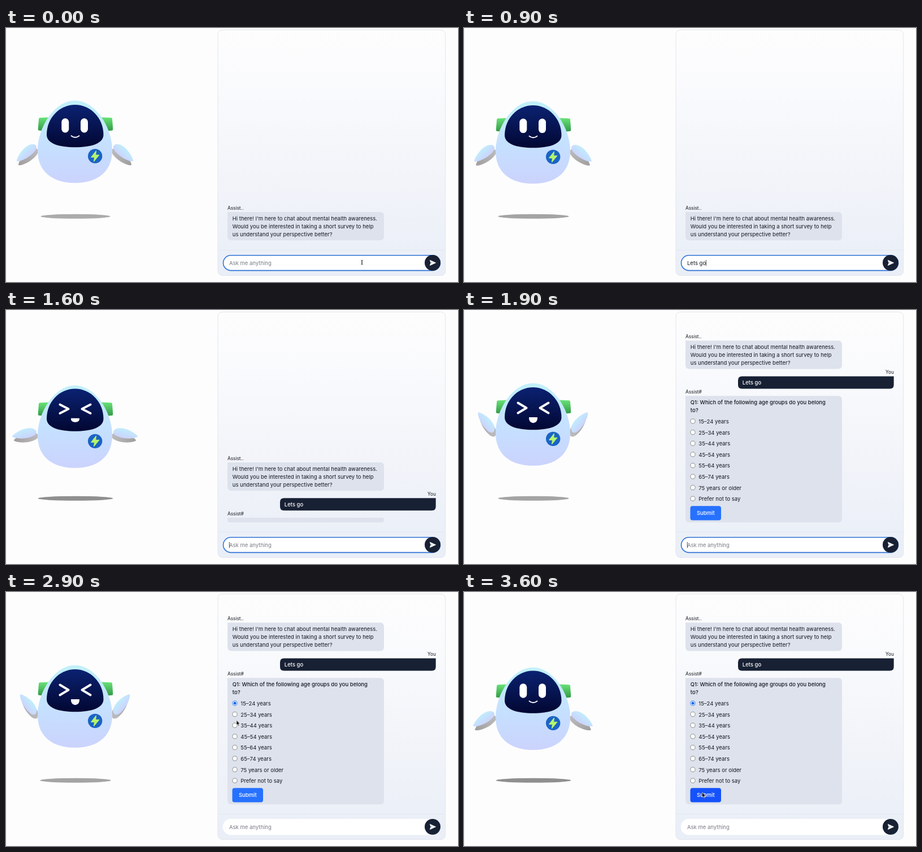
An HTML page that plays this animation: 800x450 px, repeating every 6.6 s.

```html
<!DOCTYPE html>
<html lang="en">
<head>
<meta charset="utf-8">
<title>Survey assistant</title>
<style>
html, body { margin: 0; width: 100%; height: 100%; overflow: hidden; background: #fdfdfd; }
svg { display: block; width: 800px; height: 450px; }
text { font: 9.5px Inter, "Liberation Sans", sans-serif; fill: #14171f; white-space: pre; }
.label { font-size: 8.3px; }
.mid { font-weight: 500; }
.light { fill: #fff; font-weight: 500; }
.hint { fill: #777b84; }
</style>
</head>
<body>
<svg viewBox="0 0 800 450">
  <defs>
    <linearGradient id="panelFill" x2="0" y2="1">
      <stop stop-color="#fdfdfd"/><stop offset=".2" stop-color="#fafbfd"/>
      <stop offset=".6" stop-color="#f2f4f9"/><stop offset="1" stop-color="#e9eef7"/>
    </linearGradient>
    <linearGradient id="shell" x2="0" y2="1">
      <stop stop-color="#c1f1fa"/><stop offset=".5" stop-color="#c5e1ff"/><stop offset="1" stop-color="#cbd3fd"/>
    </linearGradient>
    <linearGradient id="glass" x2="0" y2="1">
      <stop stop-color="#0b2272"/><stop offset="1" stop-color="#020732"/>
    </linearGradient>
    <linearGradient id="ear" x2="0" y2="1">
      <stop stop-color="#69e377"/><stop offset="1" stop-color="#2f9544"/>
    </linearGradient>
    <linearGradient id="wing" x1="0" x2=".25" y2="1">
      <stop stop-color="#bff0fc"/><stop offset="1" stop-color="#cad5fd"/>
    </linearGradient>
    <linearGradient id="under" x2="1">
      <stop stop-color="#a19d9d"/><stop offset="1" stop-color="#bcbcbe"/>
    </linearGradient>
    <path id="leaf" d="M5 0C4-8-9-10-19-8C-29-6-38-1-39 1C-37 5-22 9-10 8C-1 7 5 5 5 0Z"/>
    <g id="arm">
      <g transform="translate(52 218)"><use class="swing" href="#leaf" fill="url(#under)"/></g>
      <g transform="translate(49 211)"><use class="swing" href="#leaf" fill="url(#wing)"/></g>
    </g>
    <path id="earShape" d="M60 159L82 158V184L58 181.5Q56.5 181 56.7 179L58 161Q58.3 159 60 159Z"/>
  </defs>
  <rect width="800" height="450" fill="#fdfdfd"/>
  <rect width="1" height="450" fill="#f0f0f1"/>

  <ellipse id="shadow" cx="123" cy="333.8" ry="4"/>
  <g id="robot">
    <use href="#earShape" fill="url(#ear)"/>
    <use href="#earShape" fill="url(#ear)" transform="translate(246) scale(-1 1)"/>
    <use href="#arm"/>
    <use href="#arm" transform="translate(244) scale(-1 1)"/>
    <path fill="url(#shell)" d="M122 128.5C158 128.5 188 176 188 217C188 256 160 274.5 122 274.5S56 256 56 217C56 176 86 128.5 122 128.5Z"/>
    <circle cx="157.7" cy="227" r="12.7" fill="#1b64c6"/>
    <path d="M159.5 217.5L150.5 229H156.5L155.5 236.5L165 225H158.7Z" fill="#b6f56e" stroke="#b6f56e" stroke-linejoin="round"/>
  </g>
  <path id="visor" fill="url(#glass)" d="M122.3 136C150 136 172.5 160 172.5 189C172.5 205 150 211.3 122.3 211.3S72 205 72 189C72 160 94 136 122.3 136Z"/>
  <g id="face" fill="#fff">
    <g id="calm">
      <rect x="98.3" y="160" width="13" height="25.5" rx="6.5"/>
      <rect x="132" y="160" width="13" height="25.5" rx="6.5"/>
      <path d="M115.5 191Q122.5 196.5 129.5 191" fill="none" stroke="#fff" stroke-width="1.9" stroke-linecap="round"/>
    </g>
    <g id="joy">
      <path id="squint" fill="none" stroke="#fff" stroke-width="4" stroke-linecap="round" stroke-linejoin="round"/>
      <path id="grin"/>
    </g>
  </g>

  <rect x="375" y="3.5" width="402.7" height="435" rx="8" fill="url(#panelFill)" stroke="#e2e5ec"/>
  <path d="M375.5 393.5H777.5" stroke="#e3e7ef"/>

  <g id="intro">
    <text class="label" x="392" y="322">Assist..</text>
    <path fill="#dde2ec" d="M392 326H662Q669 326 669 333V369Q669 376.3 662 376.3H399Q392 376.3 392 369Z"/>
    <text x="400.8" y="341">Hi there! I'm here to chat about mental health awareness.</text>
    <text x="400.8" y="355">Would you be interested in taking a short survey to help</text>
    <text x="400.8" y="369">us understand your perspective better?</text>
  </g>
  <g id="reply">
    <text class="label" x="761" y="328.5" text-anchor="end">You</text>
    <path fill="#182134" d="M492 333.3H760.7V348.3Q760.7 355.3 753.7 355.3H492Q485 355.3 485 348.3V340.3Q485 333.3 492 333.3Z"/>
    <text class="light" x="492.8" y="347.7">Lets go</text>
    <text class="label" x="392" y="364">Assist#</text>
  </g>
  <path id="loader" fill="#dde2ec" d="M392 368H665Q669 368 669 372T665 376.2H396Q392 376.2 392 372Z"/>
  <g id="quiz">
    <path fill="#dde2ec" d="M392 152.3H662Q669 152.3 669 159.3V369.3Q669 376.3 662 376.3H399Q392 376.3 392 369.3Z"/>
    <text class="mid" x="400.8" y="167.3">Q1: Which of the following age groups do you belong</text>
    <text class="mid" x="400.8" y="181.3">to?</text>
    <g id="options"></g>
    <rect id="submit" x="400.5" y="347.2" width="54.5" height="25.3" rx="4"/>
    <text class="light" x="427.8" y="363.3" text-anchor="middle">Submit</text>
  </g>

  <rect id="field" x="384.5" y="402.8" width="384" height="26.8" rx="13.4" fill="#fff" stroke-width="1.6"/>
  <text id="hint" class="hint" x="395" y="419.7">Ask me anything</text>
  <text id="typed" x="395" y="419.7"></text>
  <path id="caret" d="M0 411V421.5" stroke="#222" stroke-width=".8"/>
  <circle cx="755" cy="416" r="14" fill="#182134"/>
  <path d="M750.3 411.2L760.7 416L750.3 420.8L751.5 416.7L756 416L751.5 415.3Z" fill="#fff" stroke="#fff" stroke-width=".6" stroke-linejoin="round"/>

  <path id="beam" d="M628.3 411.3Q630 411.3 630 412.5V418Q630 419.2 628.3 419.2M631.7 411.3Q630 411.3 630 412.5V418Q630 419.2 631.7 419.2" fill="none" stroke="#333" stroke-width=".9"/>
  <path id="arrow" d="M0 0V8.6L2 6.9L3.4 10L4.8 9.4L3.5 6.3H6.1Z" fill="#111" stroke="#fff" stroke-width=".6"/>
</svg>
<script>
const LOOP = 6600, LAST = 3600, STEP = 100;
const MESSAGE = "Lets go";
const SEND = 1000, ANSWER = 1900, PICK = 2800;
const ages = ["15–24 years", "25–34 years", "35–44 years", "45–54 years",
  "55–64 years", "65–74 years", "75 years or older", "Prefer not to say"];
// pointer stops: time, x, y
const stops = [[2100, 600, 385], [2500, 469.5, 257], [2700, 406, 197], [2800, 405, 197],
  [3200, 417, 318], [3400, 421.5, 355], [3600, 421.5, 355]];

const $ = id => document.getElementById(id);
const set = (el, attrs) => { for (const k in attrs) el.setAttribute(k, attrs[k]); };
const show = (id, on) => { $(id).style.display = on ? "" : "none"; };
const shift = (id, y) => set($(id), { transform: `translate(0 ${y})` });
const clamp = v => Math.max(0, Math.min(1, v));
const mix = (a, b, k) => a + (b - a) * k;

$("options").innerHTML = ages.map((age, i) => {
  const y = 197 + i * 19.6;
  return `<circle cx="405" cy="${y}" r="4.1" fill="#fff" stroke="#767676" stroke-width=".8"/>
    <text x="415.3" y="${y + 3.9}">${age}</text>`;
}).join("") + '<circle id="dot" cx="405" cy="197" r="2.5" fill="#0b66f0"/>';
const firstRadio = $("options").querySelector("circle");
const swings = document.querySelectorAll(".swing");

function pointer(t) {
  let i = 0;
  while (i < stops.length - 2 && t > stops[i + 1][0]) i++;
  const [a, b] = [stops[i], stops[i + 1]];
  const k = clamp((t - a[0]) / (b[0] - a[0]));
  return [mix(a[1], b[1], k), mix(a[2], b[2], k)];
}

function drawRobot(t) {
  const phase = t % 1000 / 500;
  const sink = phase < 1 ? phase : 2 - phase;
  const raise = Math.min(clamp((t - 1500) / 400), clamp((3330 - t) / 400));
  const angle = mix(38 - 8.4 * sink, -54, raise);
  const happy = t > 1550 && t < 3050;
  const open = clamp((t - 1500) / 200);
  const grey = Math.round(mix(171, 136, sink));

  shift("robot", 6.7 * sink);
  shift("visor", 4.4 * sink);
  shift("face", 2.8 * sink);
  swings.forEach(el => set(el, { transform: `rotate(${-angle})` }));
  set($("shadow"), { rx: mix(61.5, 67.6, sink), fill: `rgb(${grey},${grey},${grey})` });
  show("calm", !happy);
  show("joy", happy);
  const h = mix(6.5, 9, open), m = mix(5.5, 13.5, open);
  set($("squint"), { d: `M95.5 ${173 - h}L110.5 173L95.5 ${173 + h}M149.5 ${173 - h}L134.5 173L149.5 ${173 + h}` });
  set($("grin"), { d: `M115 189.5H130Q130.5 ${189 + m * .75} 122.5 ${189 + m * .8}Q114.5 ${189 + m * .75} 115 189.5Z` });
}

function drawChat(t) {
  const sent = t >= SEND, asked = t >= ANSWER, picked = t >= PICK;
  shift("intro", asked ? -271.8 : sent ? -56 : 0);
  shift("reply", asked ? -215.8 : 0);
  show("reply", sent);
  show("loader", sent && !asked);
  show("quiz", asked);
  show("dot", picked);
  set(firstRadio, { stroke: picked ? "#0b66f0" : "#767676" });
  set($("submit"), { fill: t >= 3400 ? "#1552fb" : "#2671ff" });

  const text = sent ? "" : MESSAGE.slice(0, Math.max(0, Math.floor((t - 200) / 100)));
  $("typed").textContent = text;
  show("hint", !text);
  show("caret", t >= 200 && t < 2000);
  const end = text ? $("typed").getComputedTextLength() : 0;
  set($("caret"), { transform: `translate(${395.3 + end} 0)` });
  set($("field"), { stroke: picked ? "#fff" : "#2f72d6" });

  show("beam", t < 300);
  show("arrow", t >= 2100);
  set($("arrow"), { transform: `translate(${pointer(t)})` });
}

function render(now) {
  const t = Math.min(LAST, Math.floor(now % LOOP / STEP) * STEP);
  drawRobot(t);
  drawChat(t);
}

const start = performance.now();
function tick() {
  render(performance.now() - start);
  requestAnimationFrame(tick);
}
tick();
</script>
</body>
</html>
```
